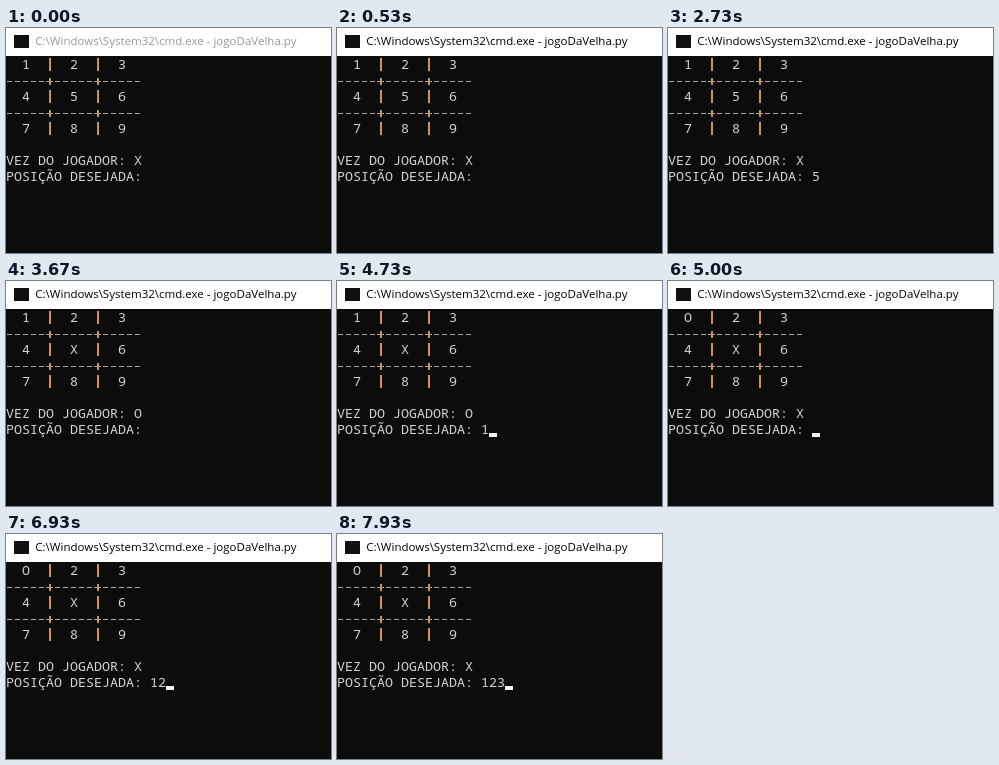
Write an HTML page that moves like this. It is 325 px wide and 225 px high and loops after 8 s.

```html
<!DOCTYPE html>
<html lang="pt">
<head>
<meta charset="utf-8">
<title>Jogo da velha</title>
<style>
  html, body { margin: 0; width: 100%; height: 100%; overflow: hidden; background: #0c0c0c; }
  svg { display: block; width: 325px; height: 225px; }
  .title { font: 11.5px "Open Sans", "Noto Sans", sans-serif; fill: #000; }
  .title.idle { fill: #999; }
  .term {
    font: 500 13.333px "Noto Sans Mono", "DejaVu Sans Mono", monospace;
    fill: #d4d4d4; white-space: pre;
  }
  .dash { fill: #a8a8a8; }
  .bar { fill: #cf9650; }
  #cursor { fill: #f2f2f2; }
</style>
</head>
<body>
<svg viewBox="0 0 325 225">
  <rect width="325" height="225" fill="#0c0c0c"/>
  <rect width="325" height="28" fill="#fff"/>
  <rect x="8" y="7" width="15" height="13" fill="#101010"/>
  <text id="title" class="title" x="29.3" y="17">C:\Windows\System32\cmd.exe - jogoDaVelha.py</text>
  <g id="grid" shape-rendering="crispEdges"></g>
  <g id="cells" class="term"></g>
  <text class="term" x="0" y="137">VEZ DO JOGADOR: <tspan id="player">X</tspan></text>
  <text class="term" x="0" y="153">POSIÇÃO DESEJADA: <tspan id="typed"></tspan></text>
  <rect id="cursor" y="152" width="8" height="4" shape-rendering="crispEdges"/>
</svg>
<script>
const LOOP = 8000, COL = 8, PROMPT = 18;
const $ = id => document.getElementById(id);

function add(parent, tag, attrs, text = "") {
  const el = document.createElementNS("http://www.w3.org/2000/svg", tag);
  for (const k in attrs) el.setAttribute(k, attrs[k]);
  el.textContent = text;
  parent.append(el);
  return el;
}

const rect = (cls, x, y, width, height) =>
  add($("grid"), "rect", { class: cls, x, y, width, height });

// Board: three rows of digits, bars between columns, dashes between rows
const cells = [];
for (let row = 0; row < 3; row++) {
  const top = 28 + row * 32;
  for (let c = 0; c < 3; c++)
    cells.push(add($("cells"), "text", { x: (2 + 6 * c) * COL, y: top + 13 }));
  for (const c of [5, 11]) rect("bar", c * COL + 3, top + 2, 2, 13);
  if (row === 2) continue;
  for (let c = 0; c < 17; c++) {
    const plus = c % 6 === 5;
    rect("dash", c * COL + (plus ? 0 : 1), top + 25, plus ? 7 : 5, 1);
    if (plus) rect("bar", c * COL + 3, top + 22, 2, 7);
  }
}

// time, board, player, typed text, cursor: 1 on, 0 off, 2 on a lower line
const START = "123456789", MID = "1234X6789", LATE = "O234X6789";
const steps = [
  [0, START, "X", "", 0],
  [1000, START, "X", "", 1],
  [1530, START, "X", "", 0],
  [1600, START, "X", "5", 1],
  [2070, START, "X", "5", 0],
  [2600, START, "X", "5", 1],
  [2730, START, "X", "5", 0],
  [2800, MID, "O", "", 1],
  [3670, MID, "O", "", 0],
  [3930, MID, "O", "1", 1],
  [4200, MID, "O", "1", 0],
  [4730, MID, "O", "1", 1],
  [4870, MID, "O", "1", 0],
  [4930, MID, "O", "1", 2],
  [5000, LATE, "X", "", 1],
  [5800, LATE, "X", "", 0],
  [6330, LATE, "X", "", 1],
  [6800, LATE, "X", "1", 1],
  [6870, LATE, "X", "1", 0],
  [6930, LATE, "X", "12", 1],
  [7270, LATE, "X", "123", 1],
  [7400, LATE, "X", "123", 0],
  [7930, LATE, "X", "123", 1]
];

function draw(t) {
  const [, board, player, typed, cursor] = steps.findLast(s => s[0] <= t);
  $("title").classList.toggle("idle", t < 530);
  cells.forEach((el, i) => el.textContent = board[i]);
  $("player").textContent = player;
  $("typed").textContent = typed;
  $("cursor").setAttribute("x", cursor === 2 ? 0 : (PROMPT + typed.length) * COL);
  $("cursor").setAttribute("y", cursor === 2 ? 184 : 152);
  $("cursor").setAttribute("visibility", cursor ? "visible" : "hidden");
}

const begin = performance.now();
function tick() {
  draw((performance.now() - begin) % LOOP);
  requestAnimationFrame(tick);
}
tick();
</script>
</body>
</html>
```
